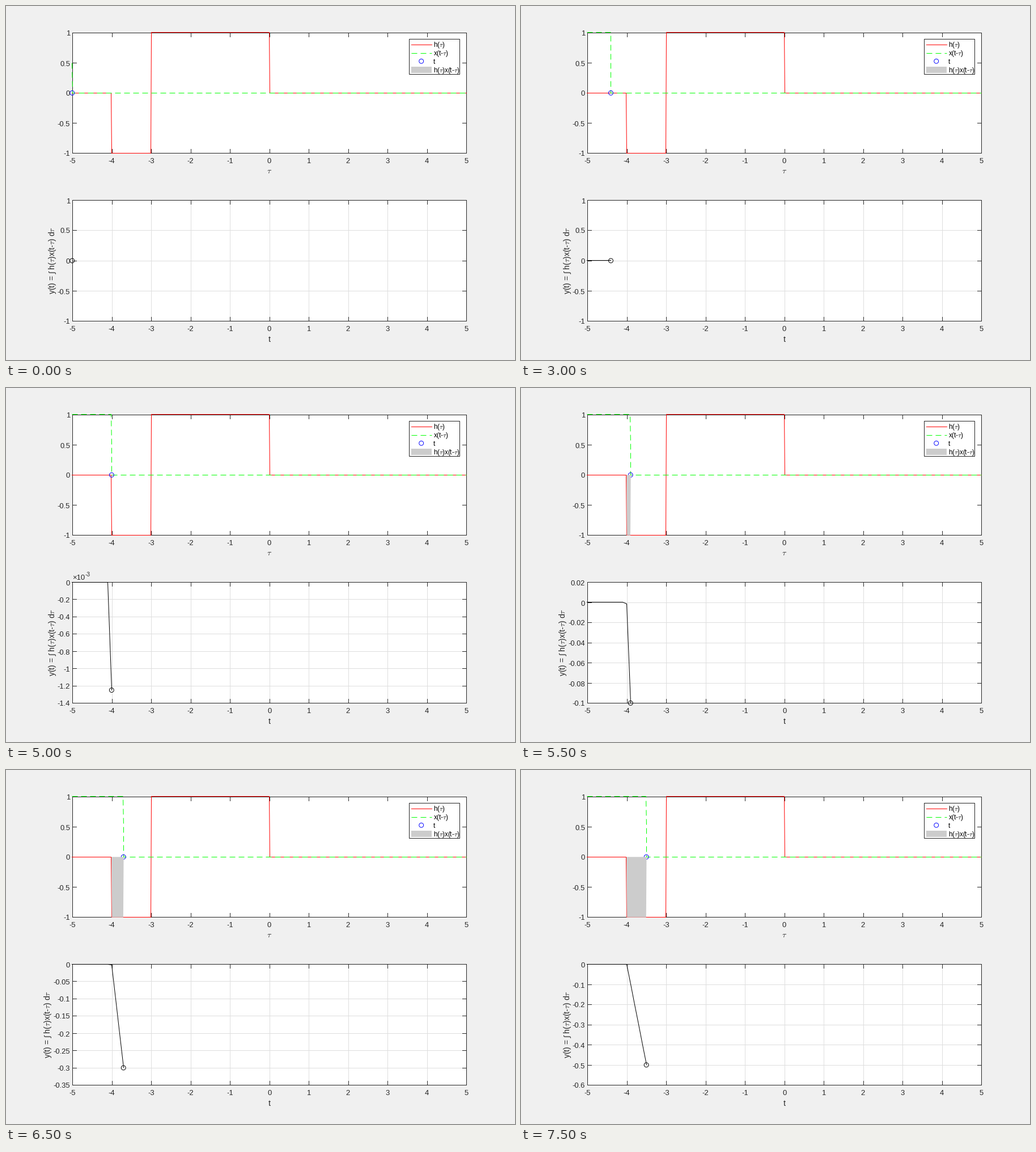
A matplotlib script that plays this animation: 898x624 px, repeating every 8 s.

```python
import matplotlib.pyplot as plt
import numpy as np
from matplotlib.animation import FuncAnimation
from matplotlib.patches import Circle, Polygon, Rectangle

W, H, DPI = 898, 624, 64
PT = 72 / DPI                      # points per pixel
FRAMES, INTERVAL = 16, 500
D = 0.005                          # sample spacing of tau
INK, GRAY = "0.15", "0.8"

# Plot edges (left, right, top, bottom): the data keeps exact positions,
# the frame around it sits on whole pixels.
TOP = (0.13 * W, 0.905 * W, 0.075 * H, 0.4162 * H)
LOW = (0.13 * W, 0.905 * W, 0.5488 * H, 0.89 * H)
TOP_BOX = (117, 812, 47, 259)
LOW_BOX = (117, 812, 342, 555)

# low, high, step, unit, nudge of the x axis "0" label
UNIT_RANGE = (-1, 1, 0.5, 1, 0)
RANGES = [
    (-1.4, 0, 0.2, 1e-3, 1),
    (-0.1, 0.02, 0.02, 1, 1),
    (-0.2, 0, 0.05, 1, 0),
    (-0.35, 0, 0.05, 1, 1),
    (-0.4, 0, 0.1, 1, 0),
    (-0.6, 0, 0.1, 1, 1),
]

plt.rcParams.update({
    "font.family": "Liberation Sans",
    "mathtext.fontset": "cm",
    "path.simplify": False,
    "axes.unicode_minus": False,
})

fig = plt.figure(figsize=(W / DPI, H / DPI), dpi=DPI, facecolor="#f0f0f0")
ax = fig.add_axes([0, 0, 1, 1])
ax.set(xlim=(0, W), ylim=(H, 0))
ax.axis("off")


def px(v, edges):
    left, right = edges[:2]
    return left + (np.asarray(v) + 5) * (right - left) / 10


def py(v, edges, low=-1, high=1):
    top, bottom = edges[2:]
    return bottom - (np.asarray(v) - low) * (bottom - top) / (high - low)


def whole(v):
    """Nearest whole pixel, halves upward."""
    return np.floor(np.asarray(v) + 0.5 + 1e-6)


def centre(v):
    """Centre of the pixel that holds v."""
    return np.floor(v) + 0.5


def line(x, y, color, z, **kw):
    return ax.plot(centre(x), centre(y), color=color, lw=PT, snap=False,
                   zorder=z, **kw)[0]


def ring(x, y, color, z):
    return ax.add_patch(Circle((x, y), 3.95, fill=False, ec=color,
                               lw=0.95 * PT, zorder=z))


def text(x, y, s, size, ha="center", color=INK, **kw):
    return ax.text(x, y, s, fontsize=size * PT, ha=ha, va="baseline",
                   color=color, zorder=20, **kw)


def frame_box(box):
    left, right, top, bottom = box
    ax.add_patch(Rectangle((left, top), right - left, bottom - top,
                           fc="white", ec="none", zorder=0))
    line([left, right, right, left, left],
         [top, top, bottom, bottom, top], INK, 3)
    for v in range(-5, 6):
        x = whole(px(v, box))
        line([x, x], [bottom, bottom - 7], INK, 3)
        line([x, x], [top, top + 7], INK, 3)
        if v or box is TOP_BOX:
            text(px(v, box) - 0.3, bottom + 18, str(v), 13)


def y_ticks(box, low, high, step):
    left, right = box[:2]
    made = []
    for v in np.arange(round((high - low) / step) + 1) * step + low:
        y = whole(py(v, box, low, high))
        made += [line([left, left + 7], [y, y], INK, 3),
                 line([right, right - 7], [y, y], INK, 3),
                 text(113, y + 5.5, f"{round(v, 4) + 0.0:g}", 13, "right")]
    return made


def legend():
    ax.add_patch(Rectangle((711.5, 58.5), 89, 62, fc="white", ec=INK,
                           lw=PT, snap=False, zorder=10))
    line([715, 751], [68, 68], "red", 11)
    line([715, 751], [83, 83], "lime", 11, ls=(0, (10, 6)))
    ring(732.7, 97.3, "blue", 11)
    ax.add_patch(Rectangle((715, 107), 36, 11, fc=GRAY, ec="none", zorder=11))
    names = [r"h($\tau$)", r"x(t-$\tau$)", "t", r"h($\tau$)x(t-$\tau$)"]
    for y, name in zip((72, 87, 101.5, 116.5), names):
        text(753.5, y, name, 11.6, "left", "black")


# fixed parts
frame_box(TOP_BOX)
frame_box(LOW_BOX)
y_ticks(TOP_BOX, -1, 1, 0.5)
for v in range(-4, 5):
    line([whole(px(v, LOW_BOX))] * 2, LOW_BOX[2:], "0.87", 1)
text(464.7, 295, r"$\tau$", 14)
text(465, 591.5, "t", 14)
y_label = text(86, 449, r"y(t) = ∫ h($\tau$)x(t-$\tau$) d$\tau$", 14,
               rotation=90, rotation_mode="anchor")
zero = text(0, LOW_BOX[3] + 18, "0", 13)
exponent = [text(117, 338, "×10", 13, "left"),
            text(139.5, 332, "-3", 10, "left")]
legend()

h_tau = [-5, -4 - D, -4 + D, -3 - D, -3 + D, -D, D, 5]
h_val = [0, 0, -1, -1, 1, 1, 0, 0]
line(px(h_tau, TOP), py(h_val, TOP), "red", 4)

# moving parts
x_line = line([], [], "lime", 5, ls=(0, (10, 6)))
t_ring = ring(0, 0, "blue", 6)
area = ax.add_patch(Polygon([(0, 0)] * 3, fc=GRAY, ec="none", snap=False,
                            zorder=7))
y_line = line([], [], "black", 5)
y_ring = ring(0, 0, "black", 6)
scale = []


def response(t):
    """Convolution for t <= -3, with half weights on the sampled edges."""
    return np.where(np.abs(t + 4) < D, -D / 4, -np.maximum(t + 4, 0))


def draw_scale(low, high, step):
    while scale:
        scale.pop().remove()
    scale.extend(y_ticks(LOW_BOX, low, high, step))
    for v in np.arange(low + step, high - step / 2, step):
        y = whole(py(v, LOW_BOX, low, high))
        scale.append(line(LOW_BOX[:2], [y, y], "0.87", 1))


def update(k):
    t = -5 + k / 10
    if k:
        tau, val = [-5, t - D, t, t + D, 5], [1, 1, 0.5, 0, 0]
    else:
        tau, val = [-5, -5 + D, 5], [0.5, 0, 0]
    x_line.set_data(centre(px(tau, TOP)), centre(py(val, TOP)))
    t_ring.center = px(t, TOP), py(0, TOP)

    overlap = t > -4 + D
    area.set_visible(overlap)
    if overlap:
        corners = [-4 - D, -4 + D, t - D, t + D]
        area.set_xy(np.column_stack([px(corners, TOP),
                                     py([0, -1, -1, 0], TOP)]))

    low, high, step, unit, nudge = RANGES[k - 10] if k >= 10 else UNIT_RANGE
    draw_scale(low, high, step)
    for part in exponent:
        part.set_visible(unit != 1)
    zero.set_x(px(0, LOW_BOX) - 0.3 + nudge)
    y_label.set_x(78 if step < 0.1 else 86)

    ts = -5 + np.arange(k + 1) / 10
    xs = px(ts, LOW)
    ys = py(response(ts) / unit, LOW, low, high)
    y_line.set_data(centre(xs), centre(ys))
    y_ring.center = xs[-1], ys[-1]
    return []


anim = FuncAnimation(fig, update, frames=FRAMES, interval=INTERVAL,
                     init_func=lambda: update(0), repeat=True,
                     repeat_delay=0, blit=False)
plt.show()
```
